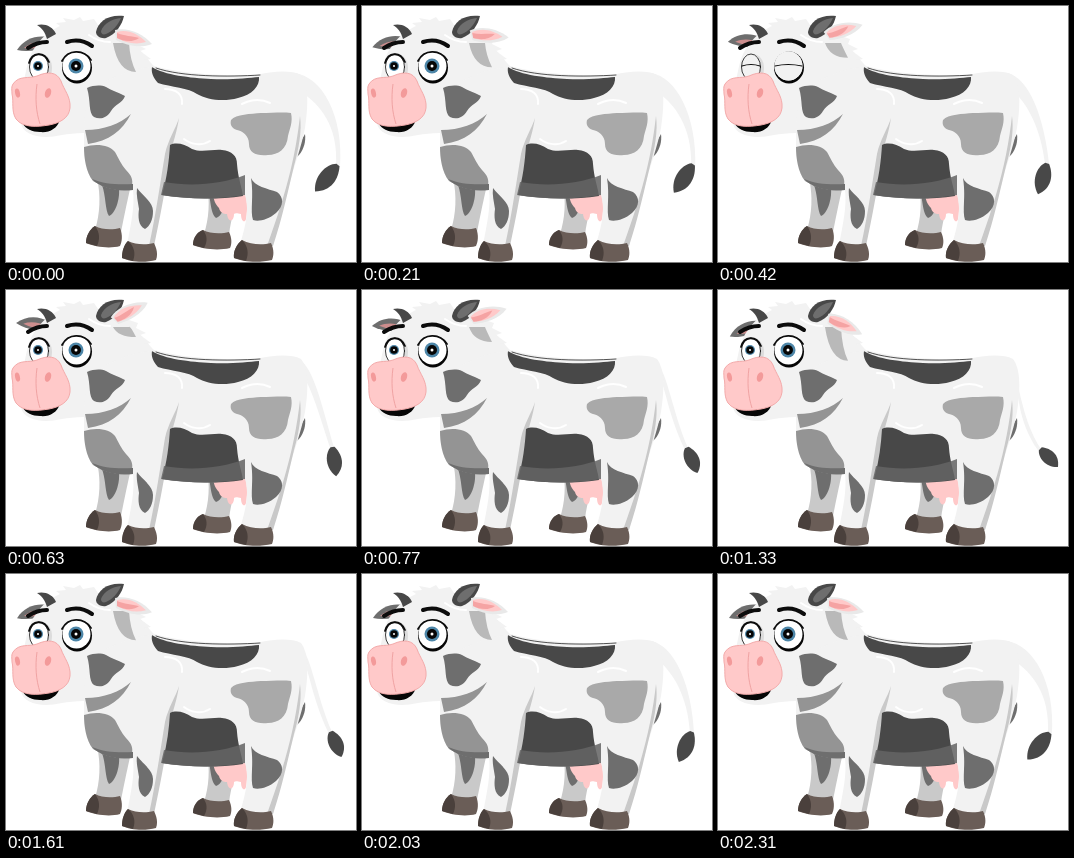
An HTML page that plays this animation: 350 px wide and 256 px high, repeating every 2.38 s.

```html
<!DOCTYPE html>
<html lang="en">
<head>
<meta charset="utf-8">
<title>Cow</title>
<style>
html, body { margin: 0; width: 100%; height: 100%; overflow: hidden; background: #fff; }
svg { display: block; width: 100vw; height: 100vh; }
.skin { fill: #f2f2f2; }
.shade { fill: #c9c9c9; }
.dark { fill: #484848; }
.mid { fill: #6e6e6e; }
.grey { fill: #949494; }
.pale { fill: #a9a9a9; }
.pink { fill: #ffc9c9; }
.rose { fill: #f39a9a; }
.hoof { fill: #6a5d57; }
.sole { fill: #4a403c; }
.ink { fill: #060606; }
.line { fill: none; stroke: #0c0c0c; stroke-linecap: round; }
.gloss { fill: none; stroke: #fff; stroke-width: 2; stroke-linecap: round; }
</style>
</head>
<body>
<svg viewBox="0 0 350 256">
  <defs>
    <clipPath id="eyeL"><ellipse cx="33" cy="61" rx="9.5" ry="13"/></clipPath>
    <clipPath id="eyeR"><ellipse cx="70.5" cy="60" rx="14" ry="14.5"/></clipPath>
  </defs>

  <path id="tail" class="skin"/>
  <path id="tuft" class="dark"/>

  <!-- far legs -->
  <path class="shade" d="M91 172C95 190 94 208 89 224L115 226C118 210 122 192 126 174Z"/>
  <path class="mid" d="M96 179L113 183C114 194 109 208 103 210C99 204 100 190 96 179Z"/>
  <path class="hoof" d="M89 220C96 224 107 224 114 222C117 229 116 236 114 240C104 243 89 241 80 237C80 230 84 223 89 220Z"/>
  <path class="sole" d="M89 220C84 223 80 230 80 237L91 240C94 233 94 227 89 220Z"/>
  <path class="shade" d="M201 178C204 196 203 212 198 228L223 229C225 212 230 196 236 178Z"/>
  <path class="mid" d="M203 188L216 192C219 202 216 210 210 212C205 208 205 198 203 188Z"/>
  <path class="hoof" d="M197 224C204 228 216 228 223 226C226 232 226 238 224 242C212 245 196 243 187 239C187 232 191 226 197 224Z"/>
  <path class="sole" d="M197 224C191 226 187 232 187 239L198 242C202 235 201 229 197 224Z"/>
  <path class="pink" d="M207 186L238 183C241 193 242 203 240 213C239 217 235 216 235 208C231 207 229 207 228 208C228 216 222 217 221 208C217 208 214 206 213 202C210 199 207 194 207 186Z"/>

  <!-- body -->
  <path class="mid" d="M299 128C294 137 289 146 287 154L293 149C298 143 300 135 299 128Z"/>
  <path class="skin" d="M78 78L112 30C132 38 140 52 148 60C180 69 225 70 250 69C268 65 285 64 295 69C302 78 303 96 299 122C295 143 288 160 284 176C278 200 272 220 267 240L234 238C241 217 243 200 239 189C213 194 174 193 157 189C154 205 150 222 147 240L121 239C125 218 129 200 127 184C109 185 92 181 85 172C78 160 78 150 78 122Z"/>
  <path class="shade" d="M294 110C290 145 283 180 261 240L267 240C276 213 282 185 288 160C293 142 296 125 294 110Z"/>
  <path class="shade" d="M173 112C171 126 167 136 165 146C160 180 154 212 148 240L143 240C150 208 155 172 159 148C162 134 170 122 173 112Z"/>
  <path class="dark" d="M146 61C158 69 185 72 205 73C225 74 242 72 253 71C254 80 246 89 232 92C218 96 201 94 191 88C183 82 165 81 152 77C147 72 145 66 146 61Z"/>
  <path class="line" d="M150 62C176 71 222 71 254 69" stroke-width=".7"/>
  <path class="grey" d="M79 124C98 124 114 118 125 108C116 125 103 135 82 138Z"/>
  <path class="grey" d="M78 141C90 137 104 139 109 146C113 153 115 158 120 164C126 170 127 174 126 180C110 182 94 180 87 175C80 166 78 152 78 141Z"/>
  <path class="mid" d="M86 173C98 178 112 179 127 178L127 184C109 186 95 182 86 173Z"/>
  <path class="dark" d="M164 139C170 136 179 138 186 143C195 147 207 143 216 144C226 145 231 150 231 158C232 172 236 182 237 190C210 194 180 193 156 189C161 172 163 155 164 139Z"/>
  <path d="M158 176C186 181 216 178 239 169L239 189C212 194 180 193 155 189Z" fill="#646464" opacity=".85"/>
  <path class="pale" d="M225 114C230 108 245 108 255 107C265 107 277 106 285 107C287 116 284 122 282 130C281 143 272 149 262 149C250 150 243 147 243 138C243 129 236 125 231 124C225 122 224 118 225 114Z"/>
  <path class="mid" d="M245 172C248 180 262 183 271 186C278 191 278 200 270 207C262 214 252 216 247 214C244 205 248 190 245 172Z"/>
  <path class="mid" d="M131 182C137 190 147 196 147 205C147 214 144 220 139 223C132 220 132 210 133 203C132 196 130 189 131 182Z"/>
  <path class="gloss" d="M159 83C170 83 177 88 176 98M178 133C186 139 196 140 204 135M236 98C246 93 256 93 264 97"/>
  <path class="hoof" d="M122 235C130 239 140 239 148 237C151 243 152 249 150 254C139 257 124 256 116 252C116 245 118 239 122 235Z"/>
  <path class="sole" d="M122 235C118 239 116 245 116 252L127 255C130 247 128 240 122 235Z"/>
  <path class="hoof" d="M236 234C245 239 257 239 265 237C268 243 268 249 266 254C253 257 237 256 228 252C227 245 231 238 236 234Z"/>
  <path class="sole" d="M236 234C231 238 227 245 228 252L240 255C243 247 242 240 236 234Z"/>

  <!-- head -->
  <g id="earL">
    <path class="mid" d="M41 31C30 29 18 33 11 44C20 46 32 45 41 40Z"/>
    <path class="rose" d="M41 36C32 35 24 37 18 42C26 43 34 42 41 39Z" opacity=".7"/>
  </g>
  <path class="skin" d="M30 40C38 28 46 24 54 20L50 17L60 16L57 12L68 14L74 11L77 15L88 13L92 19C106 18 118 24 123 30L132 33L130 38L140 43L134 45L145 53L138 54L148 61C124 62 105 72 92 80C82 90 78 104 78 127C60 127 50 131 40 131C27 131 17 126 15 118C5 106 7 82 18 74C21 62 22 50 30 40Z"/>
  <path class="mid" d="M81 82C88 79 95 79 100 81C106 85 112 86 119 90C117 97 109 98 105 105C101 112 94 114 88 111C82 107 85 95 81 82Z"/>
  <path id="patch" fill="#b9b9b9"/>
  <path class="dark" d="M31 19C38 17 47 20 50 28L41 33C39 26 36 22 31 19Z"/>
  <path class="dark" d="M90 26C92 15 103 8 118 10C116 19 110 28 100 32C95 33 90 30 90 26Z"/>
  <path class="mid" d="M95 25C98 17 106 13 115 12C112 19 107 25 100 28C97 29 95 28 95 25Z"/>
  <path class="gloss" d="M83 29C90 34 98 36 104 36"/>
  <g id="earR">
    <path d="M109 24C120 21 136 26 146 38C134 43 120 39 110 34Z" fill="#e9e9e9"/>
    <path class="pink" d="M111 26C122 23 132 28 140 36C130 39 120 37 111 32Z"/>
    <path class="rose" d="M111 27C118 30 126 30 133 32C126 37 117 35 111 32Z" opacity=".8"/>
  </g>

  <!-- eyes -->
  <ellipse cx="35" cy="62" rx="11" ry="14" fill="#dcdcdc"/>
  <g clip-path="url(#eyeL)">
    <path d="M20 44H52V80H20Z" fill="#fff"/>
    <circle cx="32" cy="60" r="5" fill="#4d86a8"/><circle cx="32" cy="60" r="3.8" class="ink"/><circle cx="32" cy="60" r="1" fill="#fff"/>
    <path id="lidL" class="skin"/>
  </g>
  <ellipse class="line" cx="33" cy="61" rx="9.5" ry="13" stroke-width=".8"/>
  <ellipse class="ink" cx="71" cy="61.5" rx="15" ry="16"/>
  <g clip-path="url(#eyeR)">
    <path d="M50 42H90V80H50Z" fill="#fff"/>
    <circle cx="70" cy="60" r="7.5" fill="#4d86a8"/><circle cx="70" cy="60" r="5" class="ink"/><circle cx="70" cy="60" r="1.5" fill="#fff"/>
    <path id="lidR" class="skin"/>
  </g>
  <path id="crease" class="line" d="M24 60Q33 57 42 60M57 60Q70 57 84 60" stroke-width="1.2"/>
  <path id="lashes" class="line" d="M23 57C26 46 38 45 43 56M56 55C62 43 78 43 85 54" stroke-width="1.8"/>
  <path class="line" d="M22 42C28 38 34 36 41 36M61 36C70 33 79 35 86 40" stroke-width="4"/>

  <!-- muzzle -->
  <path class="ink" d="M16 117C27 121 42 120 54 114C51 123 43 127 34 126C26 126 20 123 16 117Z"/>
  <path class="pink" d="M7 78C13 69 23 73 31 70C42 65 51 66 55 75C58 84 65 91 64 102C63 112 54 117 43 119C31 121 17 122 10 113C5 105 8 96 6 88C6 84 5 81 7 78Z" stroke="#f3abab"/>
  <path d="M31 78C29 92 30 106 34 118" fill="none" stroke="#f0a3a3"/>
  <ellipse class="rose" cx="11.5" cy="87" rx="2.4" ry="4.6" transform="rotate(-12 12 87)"/>
  <ellipse class="rose" cx="42" cy="87" rx="3" ry="5" transform="rotate(18 42 87)"/>
</svg>
<script>
const LOOP = 2380, STEP = 70;
const el = id => document.getElementById(id);
const set = (id, name, value) => el(id).setAttribute(name, value);
const ease = x => (1 - Math.cos(Math.PI * x)) / 2;

// Eased value between [time, value] stops
function track(stops, t) {
  const i = stops.findIndex(s => s[0] > t);
  if (i < 0) return stops.at(-1)[1];
  const [t0, a] = stops[i - 1], [t1, b] = stops[i];
  return a + (b - a) * ease((t - t0) / (t1 - t0));
}

const earTurn = [[0, 0], [630, -42], [1120, 15], [1680, 0]];
const blink = [[0, 0], [280, 0], [385, 1], [455, 1], [560, 0]];

function drawTail(t) {
  const c = Math.cos(2 * Math.PI * t / LOOP);
  const x = 327 + 5 * c, y = 157 + 2 * c * c;
  const len = 30 + 5 * c, wide = 9 + c;
  set("tail", "d", `M288 67C${308 + 8 * c} 70 ${318 + 20 * c} ${118 - 8 * c} ${x + 2} ${y + 2}
    L${x - 2} ${y + 2}C${315 + 18 * c} ${124 - 6 * c} ${306 + 6 * c} 98 298 88Z`);
  set("tuft", "d", `M0 -2C${len * .3} ${-wide} ${len * .7} ${-wide * 1.2} ${len} 0C${len * .7} ${wide * 1.1} ${len * .2} ${wide} 0 2Z`);
  set("tuft", "transform", `translate(${x} ${y}) rotate(${87 + 44 * c})`);
}

function drawLid(id, x, top, height, close) {
  const y = top + height * close;
  set(id, "d", `M${x - 20} ${top - 9}V${y - 5}Q${x} ${y + 5} ${x + 20} ${y - 5}V${top - 9}Z`);
}

function draw(t) {
  drawTail(t);
  const turn = track(earTurn, t), close = track(blink, t);
  set("earL", "transform", `rotate(${-turn * .5} 40 36)`);
  set("earR", "transform", `rotate(${turn} 111 31)`);
  const low = 66 + turn * .45;
  set("patch", "d", `M107 37L123 37Q124 ${low - 12} 130 ${low}Q112 ${low} 107 37Z`);
  drawLid("lidL", 33, 47, 34, close);
  drawLid("lidR", 70, 45, 38, close);
  set("crease", "opacity", close);
  set("lashes", "opacity", 1 - close);
}

const start = performance.now();
function tick() {
  const t = (performance.now() - start) % LOOP;
  draw(Math.floor(t / STEP) * STEP);
  requestAnimationFrame(tick);
}
tick();
</script>
</body>
</html>
```
